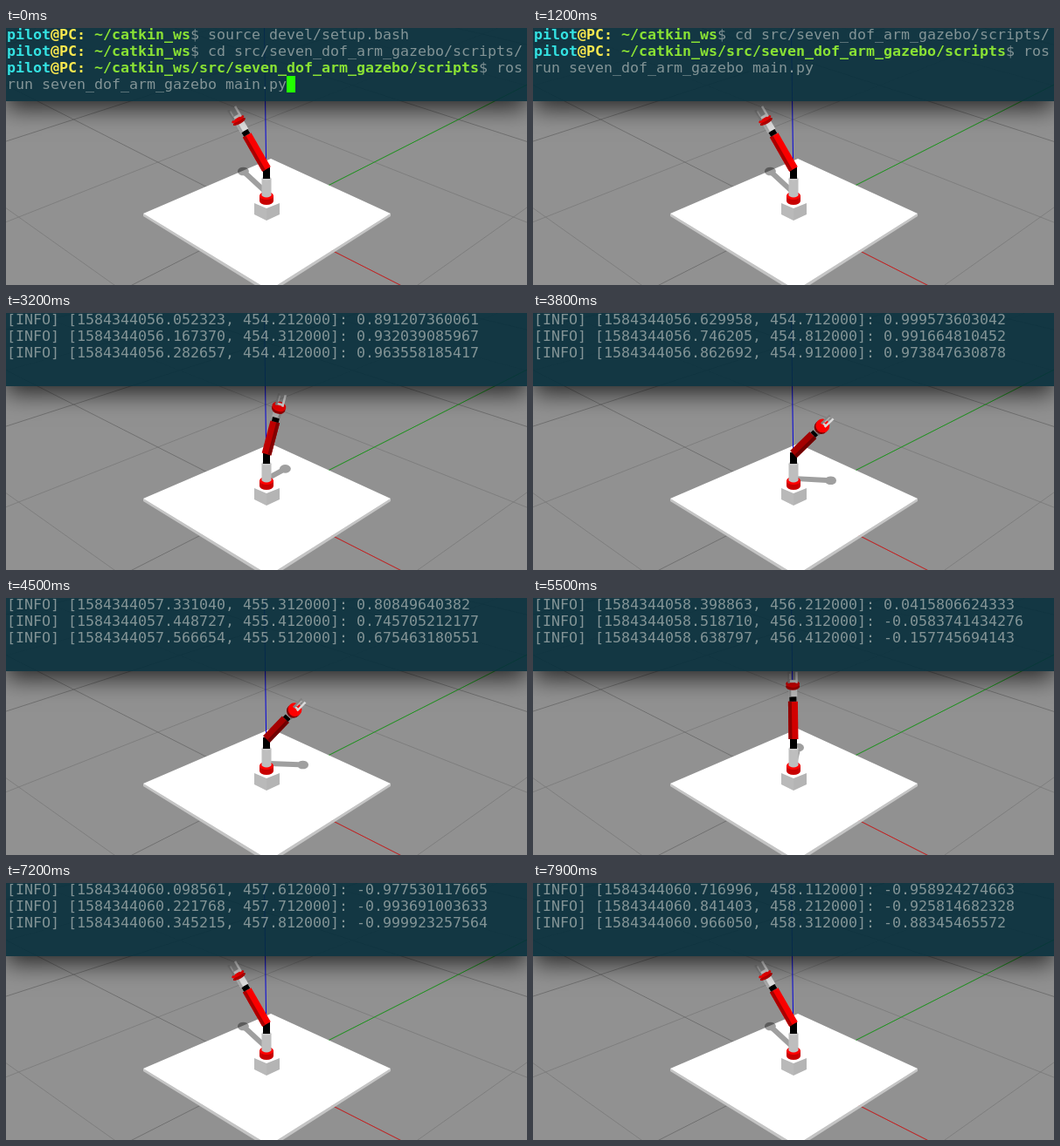
An HTML page with a canvas for the animation above (8000 ms loop, 596 px wide and 295 px high).

```html
<!DOCTYPE html>
<html>
<head>
<meta charset="utf-8">
<style>
html, body { margin: 0; width: 100%; height: 100%; overflow: hidden; background: #919191; }
canvas { position: absolute; left: 0; top: 0; }
#term {
  position: absolute; left: 0; top: 0; width: 596px; height: 84px; overflow: hidden;
  background: rgba(6, 46, 59, .9); box-shadow: 0 8px 26px rgba(0, 0, 0, .75);
}
pre {
  position: absolute; left: 1px; top: -2px; margin: 0; color: #839496;
  font: 16.61px/19px "DejaVu Sans Mono", monospace;
}
.user { color: #34e2e2; } .host { color: #fce94f; } .path { color: #8ae234; }
.cursor { background: #2f0; }
</style>
</head>
<body>
<canvas id="view" width="596" height="295"></canvas>
<div id="term"><pre id="text"></pre></div>
<script>
const LOOP = 8000, ENTER = 1100;
const g = document.getElementById('view').getContext('2d');
const text = document.getElementById('text');

// The picture advances in 100 ms steps, with one long stall and a stutter near the end.
function step(ms) {
  const t = Math.floor(ms / 100) * 100;
  if (t > 2400 && t < 3200) return 2400;
  return t >= 5000 && t % 400 === 100 ? t - 100 : t;
}

// ---------- terminal ----------
const prompt = (path, cmd) =>
  `<b><span class="user">pilot</span><span class="host">@PC:</span> <span class="path">${path}</span></b>$ ${cmd}`;
const SHELL = [
  prompt('~/catkin_ws', 'source devel/setup.bash'),
  prompt('~/catkin_ws', 'cd src/seven_dof_arm_gazebo/scripts/'),
  prompt('~/catkin_ws/src/seven_dof_arm_gazebo/scripts', 'ros'),
  'run seven_dof_arm_gazebo main.py'
];

// Wall clock of the nth sample: the rate drops slowly.
function clock(n) {
  const m = n - 3;
  return 55.140587 + .113007 * m + .00012 * m * m;
}
function logLine(n) {
  const value = n ? +Math.sin(n / 10).toPrecision(12) : '0.0';
  return `[INFO] [${(1584344000 + clock(n)).toFixed(6)}, ${(453.112 + n / 10).toFixed(6)}]: ${value}`;
}

function drawText(t) {
  let rows = [...SHELL];
  if (t >= ENTER) {
    for (let n = 0; clock(n) <= 53.15 + t / 1000; n++) rows.push(logLine(n));
    rows.push('');
  } else if (t < 600) rows[3] += '<span class="cursor"> </span>';
  const html = rows.slice(-4).join('\n');
  if (html !== drawText.last) text.innerHTML = drawText.last = html;
}

// ---------- drawing helpers ----------
function poly(color, ...p) {
  g.fillStyle = color;
  g.beginPath();
  for (let i = 0; i < p.length; i += 2) g.lineTo(p[i], p[i + 1]);
  g.fill();
}
function line(color, width, x1, y1, x2, y2) {
  g.strokeStyle = color;
  g.lineWidth = width;
  g.beginPath();
  g.moveTo(x1, y1);
  g.lineTo(x2, y2);
  g.stroke();
}
function oval(color, x, y, rx, ry, turn = 0) {
  g.fillStyle = color;
  g.beginPath();
  g.ellipse(x, y, rx, ry, turn, 0, 7);
  g.fill();
}
function ground(x, y) {
  const u = (x + y) / 2, v = (x - y) / 2, w = 1 - .143 * v;
  return [297.5 + 141.5 * u / w, 217 + 72 * v / w];
}
const floorLine = (color, a, b) => line(color, .9, ...ground(...a), ...ground(...b));

// ---------- scene ----------
function drawFloor() {
  g.fillStyle = '#919191';
  g.fillRect(0, 0, 596, 295);
  for (let k = -8; k <= 8; k += 2) {
    const color = k % 4 ? '#7c7c7c' : '#6c6c6c';
    floorLine(color, [k, k - 8], [k, 20]);
    floorLine(color, [-20, k], [k + 8, k]);
  }
  floorLine('#d81818', [0, 0], [3, 0]);
  floorLine('#18a018', [0, 0], [0, 20]);
  poly('#c4c4c4', 157, 213, 301, 301, 440, 213, 440, 216, 301, 305, 157, 216);
  poly('#fff', 157, 213, 303, 150, 440, 213, 301, 301);
  line('#0000dc', 1, 295.5, 0, 297.7, 165);
}

function drawBase() {
  poly('#fff', 284, 201, 298, 195, 313, 201, 298, 208);
  poly('#b9b9b9', 284, 201, 298, 207, 298, 221, 284, 214);
  poly('#b4b4b4', 298, 207, 313, 201, 313, 214, 298, 221);
  oval('#c80000', 298, 198.5, 8, 4.5);
  g.fillRect(290, 192, 16, 6.5);
  oval('#f00', 298, 192.5, 8, 4.5);
  oval('#bebebe', 298, 191.5, 5.5, 3);
  g.fillRect(292.5, 173, 11, 18.5);
  oval('#c8c8c8', 298, 173, 5.5, 2.5);
}

// Tilt in degrees: a smooth curve through a few poses, at rest outside them.
const POSES = [[1650, -40], [2000, -32], [3200, 17], [4150, 51], [5500, -1], [6650, -40]];
function slope(i) {
  const a = POSES[i - 1], b = POSES[i + 1];
  return a && b ? (b[1] - a[1]) / (b[0] - a[0]) : 0;
}
function tilt(t) {
  const i = POSES.findIndex(p => p[0] > t);
  if (i < 1) return -40;
  const [t0, a] = POSES[i - 1], [t1, b] = POSES[i];
  const d = t1 - t0, k = (t - t0) / d, k2 = k * k, k3 = k2 * k;
  return a + (b - a) * (3 * k2 - 2 * k3)
    + d * (slope(i - 1) * (k3 - 2 * k2 + k) + slope(i) * (k3 - k2));
}

function drawShadow(s) {
  const x = 305 + 57 * s, y = 170 + 22 * s + 14 * s * s;
  const along = k => [299 + (x - 299) * k, 190 + (y - 190) * k];
  const [bx, by] = along(.9);
  g.strokeStyle = '#00000060';
  g.lineWidth = 6;
  g.lineJoin = 'round';
  g.beginPath();
  g.moveTo(...along(.05));
  g.lineTo(...along(.8));
  g.ellipse(bx, by, 3.5, 1.8, 0, Math.PI, 3 * Math.PI);
  g.stroke();
}

function drawArm(angle) {
  const s = Math.sin(angle), c = Math.cos(angle), lean = Math.max(0, s);
  const dx = 62 * s, dy = 17 * s - 77 * c, len = Math.hypot(dx, dy);
  const nx = -dy / len, ny = dx / len, turn = Math.atan2(ny, nx);
  const light = .82 - .25 * s, side = s > 0 ? 1 : -1;
  const red = k => `rgb(${Math.min(255, 255 * k)},0,0)`;
  const grey = k => `rgb(${[1, 1, 1].map(() => Math.min(255, 228 * k))})`;
  const at = (k, off = 0) => [298 + dx * k + nx * off, 162 + dy * k + ny * off];
  const link = (color, width, a, b, off = 0) => line(color, width, ...at(a, off), ...at(b, off));

  const ring = .81 - .08 * lean, elbow = .56 - .07 * lean;
  line('#000', 8, 298, 173, 298, 160);
  link(red(light), 11, 0, elbow);
  link(red(light * .68), 4, 0, elbow, 3.5 * side);
  link('#000', 8, elbow, elbow + .08);
  link(grey(light), 10, elbow + .07, ring);
  link(grey(light * .75), 3, elbow + .07, ring, 3.5 * side);

  const flat = Math.min(8, Math.max(2.5, 4.2 + 5.2 * s));
  oval(red(light * .75), ...at(ring - .03), 8, flat, turn);
  oval(red(.86 + .2 * Math.abs(s)), ...at(ring + .01), 8, flat, turn);

  const spread = 4.5 - 2.5 * lean;
  link('#d6d6d6', spread * 2, ring + .03, ring + .07);
  link('#858585', 2.5, ring + .02, 1, -spread);
  link('#dcdcdc', 2.5, ring + .02, 1, spread);
  link('#b4b4b4', 1.5, ring + .08, .97, -spread + 1.5);
}

function frame(now) {
  const t = step(now % LOOP), angle = tilt(t) * Math.PI / 180;
  drawFloor();
  drawShadow(Math.sin(angle));
  drawBase();
  drawArm(angle);
  drawText(t);
  requestAnimationFrame(frame);
}
requestAnimationFrame(frame);
</script>
</body>
</html>
```
